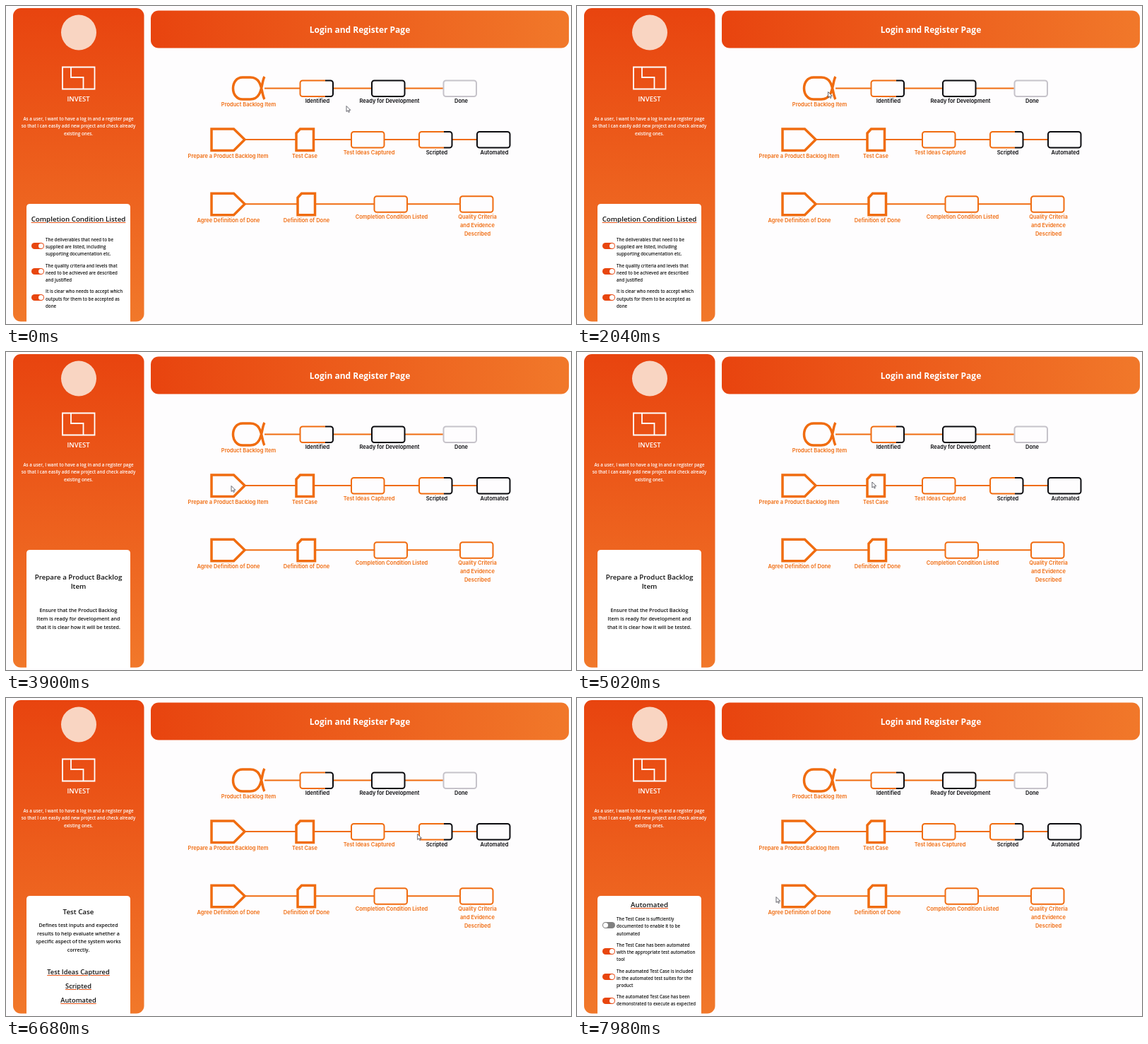
These frames come from a looping animation (800 by 450 pixels, 8 s). An HTML page:

```html
<!DOCTYPE html>
<html lang="en">
<head>
<meta charset="utf-8">
<title>Login and Register Page</title>
<style>
  html, body { margin: 0; width: 100%; height: 100%; overflow: hidden; background: #fefdfe; }
  svg { position: absolute; left: 0; top: 0; width: 800px; height: 450px; }
  text { font-family: Inter, sans-serif; font-weight: 600; font-size: 7.5px; text-anchor: middle; }
  .ui { font-family: "Open Sans", sans-serif; fill: #fff; }
  .story { font-size: 6.25px; }
  .panel { position: absolute; left: 29px; top: 0; width: 147px; height: 450px; display: none;
    font: 600 7.1px/10px "Open Sans", sans-serif; color: #111; text-align: center; }
  .panel.on { display: block; }
  .panel p { position: absolute; margin: 0; left: 0; width: 147px; white-space: nowrap; }
  .panel .title { font-size: 9.75px; }
  .panel .link { font-size: 9.3px; }
  .panel .under { text-decoration: underline 1px #e8551a; text-underline-offset: 1px; }
  .panel .item { left: 27px; width: 120px; font-size: 6.2px; text-align: left; }
  .panel i { position: absolute; left: 7px; width: 18px; height: 9px; border-radius: 5px; background: #e8460f; }
  .panel i::after { content: ""; position: absolute; top: 1px; right: 1px; width: 7px; height: 7px;
    border-radius: 50%; background: #fff; }
  .panel i.off { background: #808080; }
  .panel i.off::after { right: 10px; }
</style>
</head>
<body>
<svg viewBox="0 0 800 450">
  <defs>
    <linearGradient id="down" x2="0" y2="1">
      <stop stop-color="#e8440f"/><stop offset="1" stop-color="#f1782a"/>
    </linearGradient>
    <linearGradient id="across">
      <stop stop-color="#e8440f"/><stop offset="1" stop-color="#f1782a"/>
    </linearGradient>
    <linearGradient id="part">
      <stop offset=".76" stop-color="#f06c10"/><stop offset=".76" stop-color="#0b0b0f"/>
    </linearGradient>
  </defs>
  <rect x="10" y="3" width="185.500" height="443.500" rx="11" fill="url(#down)"/>
  <rect x="205" y="6.500" width="592" height="53" rx="11" fill="url(#across)"/>
  <text class="ui" x="501" y="38" style="font-size:12px;font-weight:700">Login and Register Page</text>
  <circle cx="103" cy="37.500" r="25" fill="#f9d5c2"/>
  <path d="M80 86.500H125.500V117.500H80ZM92 86.500V101H109.500V117.500" fill="none" stroke="#fff" stroke-width="1.800"/>
  <text class="ui" x="102.500" y="135.300" style="font-size:9.5px">INVEST</text>
  <g class="ui">
    <text class="ui story" x="102.500" y="162.400">As a user, I want to have a log in and a register page</text>
    <text class="ui story" x="102.500" y="172.400">so that I can easily add new project and check already</text>
    <text class="ui story" x="102.500" y="182.800">existing ones.</text>
  </g>
  <path d="M29 447V285Q29 280 34 280H171Q176 280 176 285V447Z" fill="#fff"/>
  <g id="flow" fill="#fefdfe" stroke-width="2"></g>
  <g id="labels"></g>
</svg>
<div id="panels"></div>
<svg viewBox="0 0 800 450">
  <path id="cursor" d="M0 0V8L1.900 6.300 3.200 9 4.500 8.400 3.300 5.800H5.800Z" fill="#fff" stroke="#3a3a44" stroke-width=".75"/>
</svg>
<script>
const ORANGE = '#f06c10', BLACK = '#0b0b0f', GREY = '#c6c3ca', PART = 'url(#part)';
const $ = id => document.getElementById(id);

// Flow chart
const line = (x1, x2, y) => `<path d="M${x1} ${y}H${x2}" stroke="${ORANGE}"/>`;
const box = (x, y, color = ORANGE) =>
  `<rect x="${x + 1}" y="${y - 11}" width="46.500" height="22.500" rx="3.500" stroke="${color}"/>`;
const shape = d => `<path d="${d}" stroke="${ORANGE}" stroke-width="3.500"/>`;
const arrow = (x, y) => shape(`M${x} ${y - 15}h31.500l15.500 15-15.500 15.500h-31.500Z`);
const sheet = (x, y) => shape(`M${x} ${y + 15.5}v-24.500l5.500-6h19v30.500Z`);

$('flow').innerHTML =
  line(365, 620, 116.5) + line(339, 668, 189) + line(339, 644, 280.3) +
  shape('M366 100C361 108 364 132 346 132H335C317 132 317 101 335 101H346C364 101 361 124 366 132') +
  box(415.5, 116.5, PART) + box(517, 116.5, BLACK) + box(618.5, 116.5, GREY) +
  arrow(291, 189) + sheet(411, 189) +
  box(488, 189) + box(584, 189, PART) + box(666, 189, BLACK) +
  arrow(291, 280.3) + sheet(413, 280.3) + box(520.5, 280.3) + box(642, 280.3);

const label = (x, y, s, color = ORANGE) => `<text x="${x}" y="${y}" fill="${color}">${s}</text>`;
$('labels').innerHTML =
  label(343.5, 142, 'Product Backlog Item') +
  label(441, 137.2, 'Identified', BLACK) +
  label(543, 137.2, 'Ready for Development', BLACK) +
  label(644.5, 137.2, 'Done', BLACK) +
  label(314.5, 214.8, 'Prepare a Product Backlog Item') +
  label(423, 214.8, 'Test Case') +
  label(514, 210, 'Test Ideas Captured') +
  label(610, 210, 'Scripted', BLACK) +
  label(691.5, 210, 'Automated', BLACK) +
  label(315, 306, 'Agree Definition of Done') +
  label(425.5, 306, 'Definition of Done') +
  label(546, 301.2, 'Completion Condition Listed') +
  label(667.5, 301.2, 'Quality Criteria') +
  label(667.5, 312.8, 'and Evidence') +
  label(667.5, 324.6, 'Described');

// Side panel contents; y is the middle of the first line
const rows = (cls, y, step, ...lines) =>
  lines.map((s, i) => `<p class="${cls}" style="top:${y + i * step - 5}px">${s}</p>`).join('');
const title = (y, ...s) => rows('title', y, 13, ...s);
const heading = (y, s) => rows('title under', y, 13, s);
const body = (y, ...s) => rows('', y, 11.7, ...s);
const links = (y, ...s) => rows('link under', y, 20, ...s);
const check = (y, on, ...s) =>
  `<i class="${on ? '' : 'off'}" style="top:${y + (s.length - 1) * 5 - 6.5 + (s.length < 3 ? 2 : 0)}px"></i>` +
  rows('item', y, 10.1, ...s);

const panels = [
  [0, heading(302, 'Completion Condition Listed') +
    check(331, 1, 'The deliverables that need to be', 'supplied are listed, including', 'supporting documentation etc.') +
    check(367.6, 1, 'The quality criteria and levels that', 'need to be achieved are described', 'and justified') +
    check(404.4, 1, 'It is clear who needs to accept which', 'outputs for them to be accepted as', 'done')],
  [13, title(309, 'Product Backlog Item') +
    body(333, 'Something to build into the', 'product to enchance its value') +
    links(382.5, 'Identified', 'Ready for Development', 'Done')],
  [21, title(318.8, 'Prepare a Product Backlog', 'Item') +
    body(365.4, 'Ensure that the Product Backlog', 'Item is ready for development and', 'that it is clear how it will be tested.')],
  [28, title(303, 'Test Case') +
    body(321, 'Defines test inputs and expected', 'results to help evaluate whether a', 'specific aspect of the system works', 'correctly.') +
    links(388.2, 'Test Ideas Captured', 'Scripted', 'Automated')],
  [38, heading(299.5, 'Scripted') +
    check(326.5, 0, 'The steps that need to be taken to', 'execute the test case are documented') +
    check(353, 1, 'The inputs to and required results of', 'each step are listed') +
    check(380, 1, 'The script ensures that the test is fully', 'repeatable') +
    check(406.5, 1, 'The criteria are clear by which the test', 'is to be judged either to have', 'succeeded or to have failed')],
  [43, heading(293, 'Automated') +
    check(313.3, 0, 'The Test Case is sufficiently', 'documented to enable it to be', 'automated') +
    check(350, 1, 'The Test Case has been automated', 'with the appropriate test automation', 'tool') +
    check(386.5, 1, 'The automated Test Case is included', 'in the automated test suites for the', 'product') +
    check(423, 1, 'The automated Test Case has been', 'demonstrated to execute as expected')]
];
$('panels').innerHTML = panels.map(p => `<div class="panel">${p[1]}</div>`).join('');
const cards = [...$('panels').children];

// Pointer stops: tick, x, y
const stops = [
  [0, 482, 141.5], [4, 374, 126], [5, 374, 126], [11, 355.5, 121.5], [13, 355, 122],
  [17, 344, 165.5], [19, 322, 188], [22, 318, 190], [25, 417.5, 184], [28, 418, 184],
  [32, 506, 197.5], [34, 513, 194], [37, 607, 192], [38, 609, 192],
  [41, 697.5, 197], [42, 697.5, 197], [43, 282, 281.5]
];

// The screen refreshes in ticks of about 186 ms, aligned to 20 ms
const tickTime = k => 20 * Math.round(k * 9.285);
function tickAt(t) {
  let k = 0;
  while (tickTime(k + 1) <= t) k++;
  return Math.min(k, 43);
}

function pointer(k) {
  const i = Math.max(1, stops.findIndex(s => s[0] >= k));
  const [a, ax, ay] = stops[i - 1], [b, bx, by] = stops[i];
  const u = (k - a) / (b - a), e = u * u * (3 - 2 * u);
  return [ax + (bx - ax) * e, ay + (by - ay) * e];
}

function draw() {
  const k = tickAt(performance.now() % 8000);
  const shown = panels.filter(p => p[0] <= k).length - 1;
  cards.forEach((c, i) => c.classList.toggle('on', i === shown));
  $('cursor').setAttribute('transform', `translate(${pointer(k)})`);
  requestAnimationFrame(draw);
}
draw();
</script>
</body>
</html>
```
